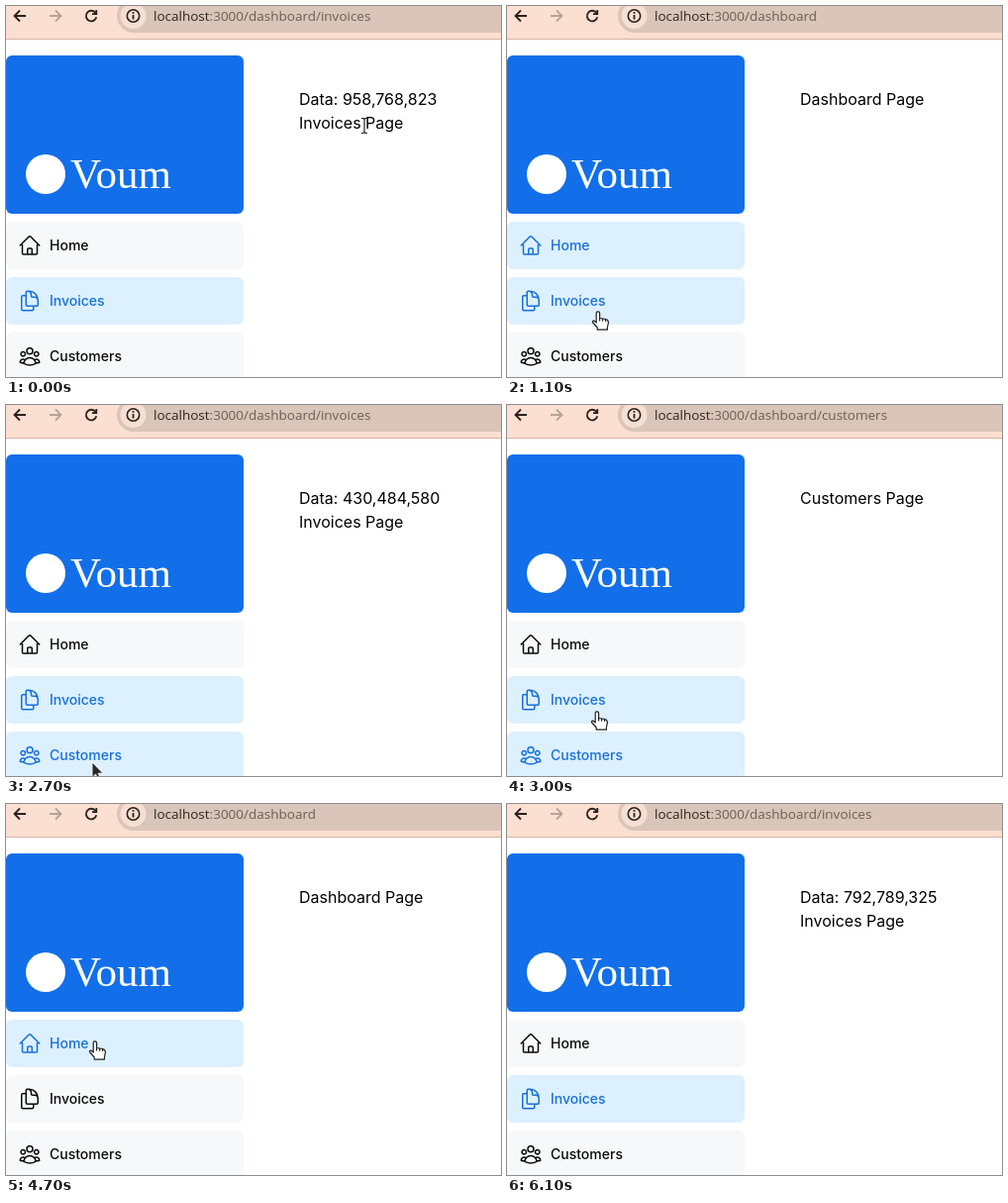
Animation, 500 px wide and 375 px high, one loop 6800 ms. Source, as an HTML page:

```html
<!DOCTYPE html>
<html lang="en">
<head>
<meta charset="utf-8">
<title>Dashboard navigation</title>
<style>
  html, body { margin: 0; width: 100%; height: 100%; overflow: hidden; background: #fff; }
  svg { display: block; width: 100%; height: 100%; }
  text { font-family: Inter, sans-serif; white-space: pre; }
  .line { fill: none; stroke: currentColor; stroke-width: 1.5; stroke-linecap: round; stroke-linejoin: round; }
  .bar { stroke-width: 1.8; stroke-linecap: butt; stroke-linejoin: miter; color: #2a211e; }
  .url { font: 13.5px "Open Sans", "Noto Sans", sans-serif; fill: #6b5f59; }
  .nav { color: #0a0a0a; }
  .nav rect { fill: #f7f8fa; }
  .nav text { font-size: 14px; font-weight: 500; fill: currentColor; }
  .nav.on { color: #176fd9; }
  .nav.on rect { fill: #dcf0fe; }
</style>
</head>
<body>
<svg viewBox="0 0 500 375">
  <!-- browser toolbar -->
  <rect width="500" height="33" fill="#fbdfd0"/>
  <rect y="33" width="500" height="1" fill="#d9b3a0"/>
  <rect x="112" y="-7" width="420" height="34" rx="17" fill="#d9c5b9"/>
  <circle cx="128.500" cy="10" r="13" fill="#f6dfd2"/>
  <g class="line bar">
    <path d="M20 10H9M14 4.500 8.500 10 14 15.500"/>
    <path d="M44 10H55M50 4.500 55.500 10 50 15.500" stroke="#b3a39b"/>
    <path d="M90.500 7A5.300 5.300 0 1 0 91.300 11.300M91.300 4V8.200H87"/>
    <circle cx="128.500" cy="10" r="6.200" stroke-width="1.600"/>
    <path d="M128.500 9V13.500M128.500 6V7.700"/>
  </g>
  <text class="url" x="149" y="15"><tspan fill="#2d2421">localhost</tspan><tspan id="path"></tspan></text>

  <!-- sidebar -->
  <rect y="50" width="240" height="160" rx="6" fill="#126fe9"/>
  <circle cx="40" cy="170" r="20" fill="#fff"/>
  <text x="65" y="184" fill="#fff" style="font:43px 'Liberation Serif',serif">Voum</text>
  <g id="sidebar"></g>

  <!-- page -->
  <text x="296" y="100" font-size="16" id="first"></text>
  <text x="296" y="124" font-size="16" id="second"></text>

  <g id="cursor">
    <g id="hand" fill="#fff" stroke="#222" stroke-width="1.200" stroke-linejoin="round">
      <path d="M-1.800 1.600a1.700 1.700 0 0 1 3.400 0V6.500l6 1q3 .6 2.800 3.600l-1 4.900v2.200H-.8V16L-5.300 11q-.8-2 1.300-1.800L-1.800 11Z"/>
      <path d="M1.600 6.500V9.500M4.600 7V9.800M7.600 7.500V10" fill="none"/>
    </g>
    <path id="arrow" d="M0 0V15.500L3.600 12.200 6.200 18 8.700 16.900 6.200 11.300H11Z" fill="#292929" stroke="#fff" stroke-width=".9"/>
    <path id="beam" d="M-3-7.500H-1L0-6.500 1-7.500H3M0-6.500V6.500M-3 7.500H-1L0 6.500 1 7.500H3" fill="none" stroke="#222" stroke-width="1.200"/>
  </g>
</svg>
<script>
const LOOP = 6800;
const byId = id => document.getElementById(id);

const navItems = [
  { name: 'Home', top: 218, icon: 'M2.250 12 11.200 3.050Q12 2.400 12.800 3.050L21.750 12M4.500 9.750V20q0 1 1 1H9.750V16q0-1 1-1h2.500q1 0 1 1v5H18.500q1 0 1-1V9.750M8.250 21H16.500' },
  { name: 'Invoices', top: 274, icon: 'M15.750 17.250V20.600q0 1.150-1.150 1.150H4.900q-1.150 0-1.150-1.150V7.900q0-1.150 1.150-1.150H8.250M9.400 2.250H11.250A9 9 0 0 1 20.250 11.250V16.100q0 1.150-1.150 1.150H9.400q-1.150 0-1.150-1.150V3.400q0-1.150 1.150-1.150M9.750 2.250A3.400 3.400 0 0 1 13.500 5.600V7.100q0 1.150 1.150 1.150H16.900A3.400 3.400 0 0 1 20.250 11.600' },
  { name: 'Customers', top: 330, icon: 'M9 6.750a3 3 0 1 1 6 0a3 3 0 1 1-6 0M3 9.750a2.250 2.250 0 1 1 4.500 0a2.250 2.250 0 1 1-4.500 0M16.500 9.750a2.250 2.250 0 1 1 4.500 0a2.250 2.250 0 1 1-4.500 0M6 19.400a6 6 0 1 1 12 0Q12 22.600 6 19.400M6 18.700Q4 18.900 2.260 18.240A3 3 0 0 1 6.940 15.520M18 18.700Q20 18.900 21.740 18.240A3 3 0 0 0 17.060 15.520' }
];

byId('sidebar').innerHTML = navItems.map(({ name, top, icon }) => `
  <g class="nav" transform="translate(0 ${top})">
    <rect width="240" height="48" rx="6"/>
    <path class="line" transform="translate(12 12)" d="${icon}"/>
    <text x="44" y="29">${name}</text>
  </g>`).join('');
const navNodes = [...document.querySelectorAll('.nav')];

// [start ms, shape, x, y]
const cursorKeys = [
  [0, 'beam', 362, 121], [100, 'arrow', 364, 119], [200, 'arrow', 215, 192], [300, 'hand', 90, 234],
  [900, 'hand', 91, 243], [1000, 'hand', 92, 283], [1100, 'hand', 92, 309], [1600, 'hand', 90, 306],
  [2100, 'hand', 93, 318], [2200, 'hand', 95, 335], [2500, 'hand', 88, 358], [2700, 'arrow', 87, 361],
  [2900, 'hand', 89, 342], [3000, 'hand', 91, 310], [3200, 'hand', 89, 309], [3300, 'hand', 87, 311],
  [3500, 'hand', 89, 309], [4000, 'hand', 90, 302], [4100, 'hand', 91, 284], [4200, 'arrow', 90, 268],
  [4500, 'hand', 90, 240], [4800, 'hand', 91, 254], [4900, 'hand', 92, 284], [5000, 'hand', 92, 303],
  [5500, 'arrow', 105, 290], [5600, 'arrow', 140, 220], [5700, 'arrow', 185, 140], [5800, 'arrow', 230, 60],
  [5900, 'none', -50, -50]
];

// [start ms, nav index, first line, second line]
const pageKeys = [
  [0, 1, 'Data: 958,768,823', 'Invoices Page'],
  [800, 0, 'Dashboard Page', ''],
  [1800, 1, 'Data: 430,484,580', 'Invoices Page'],
  [2900, 2, 'Customers Page', ''],
  [3700, 1, 'Data: 594,33,734', 'Invoices Page'],
  [4700, 0, 'Dashboard Page', ''],
  [5600, 1, 'Data: 792,789,325', 'Invoices Page']
];

// The address may update slightly after the page does.
const pathKeys = [
  [0, '/invoices'], [800, ''], [2000, '/invoices'], [2900, '/customers'],
  [3700, '/invoices'], [4700, ''], [5700, '/invoices']
];

const at = (keys, t) => keys.findLast(([start]) => start <= t);

function draw(now) {
  const t = now % LOOP;
  const [, shape, x, y] = at(cursorKeys, t);
  const [, active, first, second] = at(pageKeys, t);

  byId('path').textContent = ':3000/dashboard' + at(pathKeys, t)[1];
  byId('first').textContent = first;
  byId('second').textContent = second;

  navItems.forEach(({ top }, i) => {
    const hovered = x >= 0 && x < 240 && y >= top && y < top + 48;
    navNodes[i].classList.toggle('on', i === active || hovered);
  });

  byId('cursor').setAttribute('transform', `translate(${x} ${y})`);
  for (const id of ['hand', 'arrow', 'beam']) {
    byId(id).style.display = id === shape ? '' : 'none';
  }
}

const begin = performance.now();
function tick() {
  draw(performance.now() - begin);
  requestAnimationFrame(tick);
}
tick();
</script>
</body>
</html>
```
